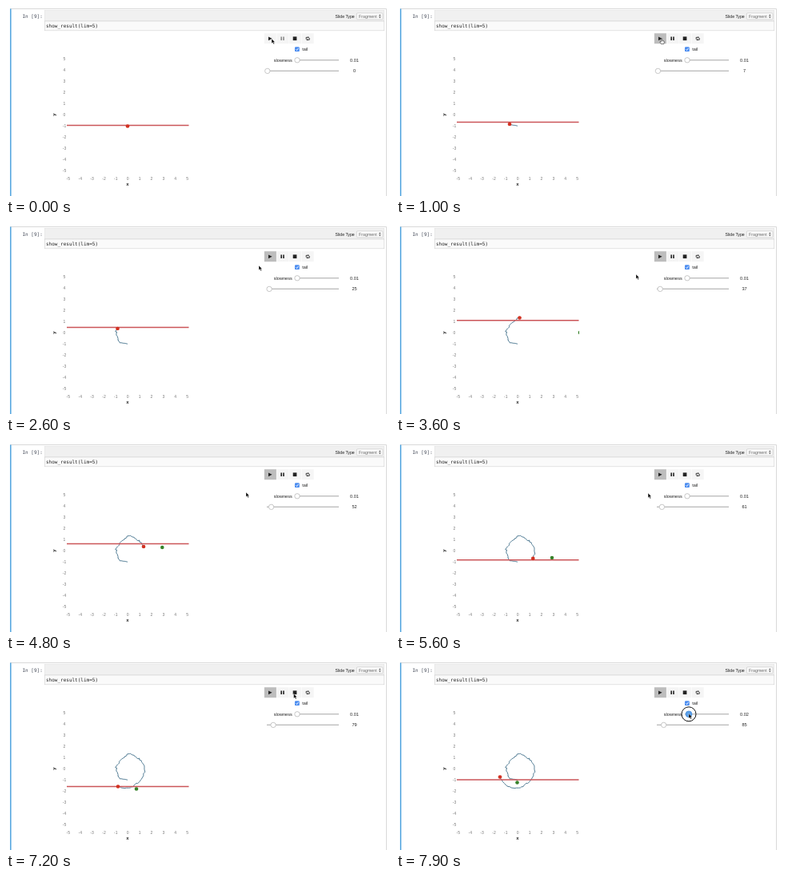
An HTML page that plays this animation: 480 by 238 pixels, repeating every 8 s.

```html
<!DOCTYPE html>
<html lang="en">
<head>
<meta charset="utf-8">
<title>Notebook simulation</title>
<style>
html, body { margin: 0; width: 100%; height: 100%; overflow: hidden; background: #fff; }
svg { display: block; width: 480px; height: 238px; }
text { font-family: "Liberation Sans", Arial, sans-serif; font-size: 5.6px; fill: #222; }
.mono { font-family: "DejaVu Sans Mono", monospace; font-size: 6px; }
.tick text { font-size: 5px; fill: #777; text-anchor: middle; }
.label { font-size: 6px; font-weight: bold; text-anchor: middle; }
.value { text-anchor: middle; }
.knob { fill: #fff; stroke: #b0b0b0; stroke-width: .7; }
.knob.drag { fill: #5a9fe8; stroke: #3d87d8; }
.track { fill: #bababa; }
.button { fill: #f5f5f5; }
.button.on { fill: #bdbdbd; }
</style>
</head>
<body>
<svg viewBox="0 0 480 238">
  <defs><clipPath id="area"><rect x="75.5" y="60" width="153.5" height="150"/></clipPath></defs>

  <path d="M5 3.5H475.5V238" fill="none" stroke="#d0d0d0" stroke-width=".8"/>
  <rect x="5" y="3.5" width="1.6" height="235" fill="#5aa9e0"/>
  <text class="mono" x="20.5" y="15" style="fill:#444a58">In [9]:</text>
  <rect x="48.4" y="5.4" width="424.4" height="13.4" fill="#f0f0f0" stroke="#dcdcdc" stroke-width=".5"/>
  <rect x="48.4" y="19" width="424.4" height="11.8" fill="#fafafa" stroke="#d0d0d0" stroke-width=".6"/>
  <text class="mono" x="50" y="27.2">show_result(lim=5)</text>
  <text x="411.6" y="14.8" style="font-size:5.2px">Slide Type</text>
  <rect x="438.4" y="8.8" width="32.6" height="8" rx="1.2" fill="#fafafa" stroke="#c4c4c4" stroke-width=".6"/>
  <text x="441" y="14.8" style="font-size:5.3px;fill:#666">Fragment</text>
  <path d="M465.9 12.2l1.4-1.8 1.4 1.8zM465.9 13.4l1.4 1.8 1.4-1.8z" fill="#555"/>

  <g id="buttons"></g>
  <g fill="#222">
    <path d="M328 38.4l4.6 2.4-4.6 2.4z"/>
    <path id="pause" d="M343.4 38.4h1.6v4.6h-1.6zM346.2 38.4h1.6v4.6h-1.6z"/>
    <path d="M358.7 38.4h4.7v4.7h-4.7z"/>
  </g>
  <path d="M375.2 41.6V39.3H377.6M379.2 40V42.3H376.8" fill="none" stroke="#222" stroke-width=".9"/>
  <path d="M377.5 38l1.5 1.3-1.5 1.3zM376.9 41l-1.5 1.3 1.5 1.3z" fill="#222"/>

  <rect x="361" y="51.3" width="5.8" height="5.8" rx="1.2" fill="#4a8cf0"/>
  <path d="M362.4 54.3l1.2 1.3 2-2.9" fill="none" stroke="#fff" stroke-width=".9"/>
  <text x="370.2" y="56.2">tail</text>
  <text x="334.8" y="69.6">slowness</text>
  <rect class="track" x="361" y="67.1" width="55" height="1.3"/>
  <rect class="track" x="326" y="80.7" width="90" height="1.3"/>
  <circle id="slowKnob" class="knob" cy="67.8" r="3.2"/>
  <circle id="stepKnob" class="knob" cy="81.4" r="3.2"/>
  <text id="slow" class="value" x="435.5" y="69.6"></text>
  <text id="step" class="value" x="435.5" y="83.2"></text>

  <g id="ticks" class="tick"></g>
  <text class="label" x="152" y="225.2">x</text>
  <text class="label" transform="translate(62 136)rotate(-90)">y</text>

  <g clip-path="url(#area)">
    <path id="tail" fill="none" stroke="#4a7690" stroke-width=".95" stroke-linejoin="round"/>
    <path id="line" d="M76 0H228.5" stroke="#cb5558" stroke-width="1.5"/>
    <circle id="goal" r="2.3" fill="#37822a"/>
    <circle id="agent" r="2.35" fill="#d23222"/>
  </g>

  <circle id="ring" fill="none" stroke="#111"/>
  <path id="arrow" d="M0 0V5.8L1.4 4.6 2.4 6.8 3.5 6.3 2.5 4.2H4.2z" fill="#000" stroke="#fff" stroke-width=".4"/>
  <path id="hand" d="M-.7 .2Q0-.6 .7 .2V2.4L3 3Q3.6 3.4 3.4 4.6L2.8 6.6H-.6L-2.3 4Q-2 3-.7 3.8z" fill="#eee" stroke="#333" stroke-width=".6"/>
</svg>
<script>
const LOOP = 8000, STEP = 100, STEPS = 85;
const $ = id => document.getElementById(id);

// time, simulation step
const COUNT = [[500, .4], [1200, 9], [1300, 9], [6500, 72.4], [7900, STEPS]];
// time, pointer x, y
const MOUSE = [[2200, 332, 41], [3000, 300, 63], [5200, 300, 63], [6500, 349, 66.5],
  [7100, 358, 36], [7600, 366, 67.3]];
// simulation step, agent x, y, line offset, green dot offset x, y
const KEYS = [
  [0, 152, 150.5, -1, 120, 5],
  [7, 142, 148, -2.4, 115, 5],
  [16, 138, 138, 0, 110, 6],
  [25, 139.5, 131, -1.5, 105, 8],
  [37, 154.5, 117.5, 3.3, 75.5, 18.5],
  [52, 172, 131, -3.5, 23.3, 1],
  [62, 170, 148, 0, 24, -1],
  [72, 155.5, 160, -.2, 24, -1.5],
  [79, 140, 158.5, 0, 23, 3],
  [STEPS, 130, 146.5, 3.5, 21.5, 7]
];

function span(table, v) {
  let i = 0;
  while (i < table.length - 2 && table[i + 1][0] <= v) i++;
  const a = table[i][0], b = table[i + 1][0];
  return [i, Math.max(0, Math.min(1, (v - a) / (b - a)))];
}

function linear(table, v) {
  const [i, p] = span(table, v);
  return table[i].slice(1).map((n, j) => n + (table[i + 1][j + 1] - n) * p);
}

function noise(n) {
  const s = Math.sin(n * 127.1 + 3.7) * 43758.5453;
  return (s - Math.floor(s)) * 2 - 1;
}

// smooth curve through the keys, with a random wobble between them
function sample(k) {
  const [i, p] = span(KEYS, k);
  const wobble = Math.sqrt(Math.max(0, Math.sin(Math.PI * p)));
  const b = KEYS[i], c = KEYS[i + 1], a = KEYS[i - 1] || b, d = KEYS[i + 2] || c;
  const [x, y, line, dx, dy] = b.slice(1).map((n, j) => {
    j++;
    const m = (c[j] - a[j]) / 2, q = (d[j] - n) / 2, gap = c[j] - n;
    return n + p * (m + p * (3 * gap - 2 * m - q + p * (m + q - 2 * gap)));
  });
  const ax = x + wobble * noise(k), ay = y + wobble * noise(k + 200);
  return { x: ax, y: ay, line: ay + line + 4.5 * wobble * noise(k + 500), gx: ax + dx, gy: ay + dy };
}

const walk = Array.from({ length: STEPS + 1 }, (_, k) => sample(k));

function place(el, x, y) {
  el.setAttribute("transform", `translate(${x} ${y})`);
}

function show(el, on) {
  el.style.display = on ? "" : "none";
}

for (let i = 0; i < 4; i++) {
  $("buttons").innerHTML += `<rect class="button" x="${322.9 + i * 15.6}" y="34.2" width="15" height="13"/>`;
}
for (let n = -5; n <= 5; n++) {
  $("ticks").innerHTML += `<text x="73" y="${138 - n * 14.08}">${n}</text>` +
    `<text x="${152.2 + n * 14.87}" y="217.6">${n}</text>`;
}

function draw(t) {
  const k = Math.round(linear(COUNT, t)[0]);
  const [mx, my] = linear(MOUSE, t), now = walk[k];
  const drag = t >= 7700, click = t >= 400 && t < 600;

  place($("agent"), now.x, now.y);
  place($("goal"), now.gx, now.gy);
  place($("line"), 0, now.line);
  $("tail").setAttribute("d", "M" + walk.slice(0, k + 1).map(p => [p.x, p.y]).join("L"));

  $("step").textContent = k;
  $("stepKnob").setAttribute("cx", 326.8 + k * .092);
  $("slow").textContent = drag ? "0.02" : "0.01";
  $("slowKnob").setAttribute("cx", drag ? 366 : 364);
  $("slowKnob").setAttribute("r", drag ? 3.9 : 3.2);
  $("slowKnob").classList.toggle("drag", drag);

  $("buttons").firstChild.classList.toggle("on", t >= 400);
  $("pause").style.opacity = t < 100 ? .5 : 1;
  show($("ring"), click || drag);
  $("ring").setAttribute("r", click ? 12.5 : 9);
  place($("ring"), click ? 331.5 : 366, click ? 41 : 67.8);

  const hand = t >= 200 && t < 2300;
  show($("hand"), hand);
  show($("arrow"), !hand);
  place($("hand"), mx, my);
  place($("arrow"), mx, my);
}

const start = performance.now();
function tick() {
  const t = (performance.now() - start) % LOOP;
  draw(Math.floor(t / STEP) * STEP);
  requestAnimationFrame(tick);
}
tick();
</script>
</body>
</html>
```
